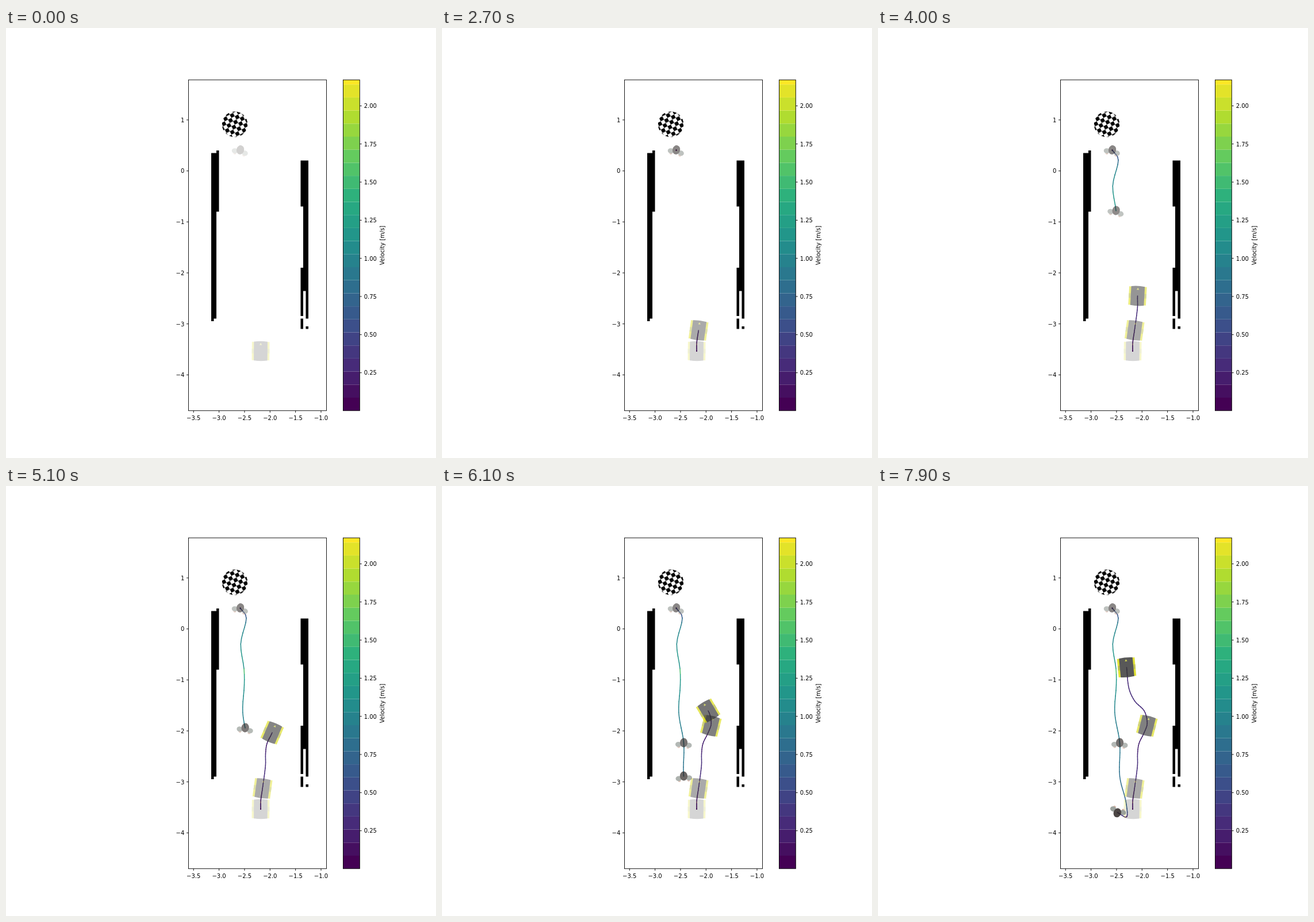
Write an HTML page that moves like this. It is 748x748 px and loops after 8 s.

```html
<!DOCTYPE html>
<html lang="en">
<head>
<meta charset="utf-8">
<title>Velocity plot</title>
<style>
html, body { margin: 0; width: 100%; height: 100%; overflow: hidden; background: #fff; }
svg { display: block; width: 100vw; height: 100vh; }
text { font: 10px "DejaVu Sans", sans-serif; }
</style>
</head>
<body>
<svg id="stage" viewBox="0 0 748 748">
  <defs>
    <pattern id="checker" width="13" height="13" patternUnits="userSpaceOnUse"
             patternTransform="translate(398 168) rotate(-27)">
      <path d="M6.5 0h6.5v6.5h-6.5zM0 6.5h6.5v6.5h-6.5z"/>
    </pattern>
    <g id="robot">
      <path d="M-15.3 -16h4.5v32h-4.5zM10.800 -16h4.500v32h-4.500z" fill="#dbdc08"/>
      <path d="M-15.300 -4h4.500v8h-4.500zM10.800 -4h4.500v8h-4.500z" fill="#b2b62c"/>
      <path d="M-11.800 -16.400Q0 -18.200 11.800 -16.400V16.400Q0 18.200 -11.800 16.400Z" fill="#333"/>
      <path d="M0 -14.200l2.200 3.600h-4.400z" fill="#bfc229"/>
    </g>
    <g id="person">
      <g fill="#d3aa99"><circle cx="-8" cy="7" r="2.500"/><circle cx="8" cy="7" r="2.500"/></g>
      <g fill="#868e88"><ellipse cx="-9" cy="3.300" rx="5.300" ry="4.500"/><ellipse cx="9" cy="3.300" rx="5.300" ry="4.500"/></g>
      <ellipse cy="-.5" rx="6.600" ry="8" fill="#241d1b"/>
    </g>
  </defs>
  <path d="M366 213h4.500v106.500h-4.500V505.500h-4.500v4.500h-4.500V217.500h9z
    M512.500 230.500h13.500V505.500h-4.500V457.500h-4.500V501h-4.500V417h4.500V310.500h-4.500z
    M512.500 505.500h4.500v18h-4.500zM521.500 519h4.500v4.500h-4.500z"/>
  <circle cx="398" cy="167.500" r="22.300" fill="url(#checker)"/>
  <g id="trails" fill="none" stroke-width="1.5" stroke-linecap="round"></g>
  <g id="figures"></g>
  <g id="bar"></g>
  <g id="axes" fill="none" stroke="#000" stroke-width=".9"></g>
  <g id="labels"></g>
</svg>
<script>
const LOOP = 8000, STEP = 100, GHOST_EVERY = 2700;
const UNIT = 88.7;
const TOP = 90.2, BOTTOM = 665.7, BAR_LEFT = 586.5, BAR_RIGHT = 615.3;
const $ = id => document.getElementById(id);

function add(parent, tag, attrs, text) {
  const el = document.createElementNS("http://www.w3.org/2000/svg", tag);
  for (const key in attrs) el.setAttribute(key, attrs[key]);
  if (text) el.textContent = text;
  parent.appendChild(el);
  return el;
}

const viridis = ["440154", "472d7b", "3b528b", "2c728e", "21918c", "28ae80", "5ec962", "addc30", "fde725"]
  .map(hex => [0, 2, 4].map(i => parseInt(hex.slice(i, i + 2), 16)));

function color(u) {
  const p = Math.max(0, Math.min(1, u)) * 8, i = Math.min(7, Math.floor(p));
  return `rgb(${viridis[i].map((c, k) => Math.round(c + (viridis[i + 1][k] - c) * (p - i)))})`;
}

// Axes and colour bar
function box(left, right) {
  add($("axes"), "rect", { x: left, y: TOP, width: right - left, height: BOTTOM - TOP });
}
function tick(x, y, dx, dy, label, attrs) {
  add($("axes"), "path", { d: `M${x} ${y}l${dx} ${dy}` });
  add($("labels"), "text", attrs, label.replace("-", "\u2212"));
}
box(317.5, 557.5);
box(BAR_LEFT, BAR_RIGHT);
for (let v = -3.5; v <= -1; v += 0.5) {
  const x = 548 + (v + 1) * UNIT;
  tick(x, BOTTOM, 0, 3.5, v.toFixed(1), { x, y: 681.5, "text-anchor": "middle" });
}
for (let v = -4; v <= 1; v++) {
  const y = 248.6 - v * UNIT;
  tick(317.5, y, -3.5, 0, String(v), { x: 310.3, y: y + 3.8, "text-anchor": "end" });
}
for (let v = 0.25; v <= 2; v += 0.25) {
  const y = 666 - v * 265.3;
  tick(BAR_RIGHT, y, 3.5, 0, v.toFixed(2), { x: 622.7, y: y + 3.8 });
}
add($("labels"), "text", { transform: "translate(658 378) rotate(-90)", "text-anchor": "middle" }, "Velocity [m/s]");

const BANDS = 25, BAND_HEIGHT = 22.7;
for (let i = 0; i <= BANDS; i++) {
  const y = Math.max(TOP, BOTTOM - (i + 1) * BAND_HEIGHT);
  const height = BOTTOM - i * BAND_HEIGHT - y;
  add($("bar"), "rect", { x: BAR_LEFT, y, width: BAR_RIGHT - BAR_LEFT, height, fill: color(i / BANDS) });
}

// Smooth curve through waypoints [seconds, x, y]
function pathThrough(points) {
  const last = points.length - 1;
  const slope = (i, k) => {
    const a = points[Math.max(0, i - 1)], b = points[Math.min(last, i + 1)];
    return (b[k] - a[k]) / (b[0] - a[0]);
  };
  return time => {
    const t = Math.max(points[0][0], Math.min(points[last][0], time));
    let i = 0;
    while (i < last - 1 && points[i + 1][0] <= t) i++;
    const a = points[i], b = points[i + 1], span = b[0] - a[0], u = (t - a[0]) / span;
    const [x, y] = [1, 2].map(k => a[k] + (b[k] - a[k]) * u * u * (3 - 2 * u)
      + span * u * (1 - u) * ((1 - u) * slope(i, k) - u * slope(i + 1, k)));
    return { x, y };
  };
}

const robotPath = pathThrough([
  [1, 443, 562], [1.9, 443.3, 546], [2.7, 446.2, 526], [3.6, 451.4, 486], [4, 451.5, 466], [4.5, 454, 448],
  [5.1, 463, 429], [5.5, 468.3, 413], [6.1, 463, 391], [6.6, 446.5, 374], [7.1, 436.5, 352], [7.9, 432.5, 315.5]
]);
const personPath = pathThrough([
  [2.7, 407.5, 212.5], [3.1, 418, 230], [3.6, 408.3, 275], [4, 414, 318], [4.3, 414.5, 346], [4.8, 411.8, 394],
  [5.4, 420.5, 447], [6.1, 420.5, 505], [6.7, 431, 548], [7.2, 433, 575], [7.9, 416.5, 568]
]);

function ease(t, from, to) {
  const u = Math.max(0, Math.min(1, (t - from) / (to - from)));
  return u * u * (3 - 2 * u);
}

// The robot faces along its path
function robotHeading(t) {
  const mid = Math.max(1.05, Math.min(7.85, t));
  const a = robotPath(mid - 0.05), b = robotPath(mid + 0.05);
  return Math.atan2(b.x - a.x, a.y - b.y) * 180 / Math.PI;
}
const personHeading = t => 13 - 17 * ease(t, 4.6, 6.2) - 156 * ease(t, 6.3, 7.9);
const burst = t => t > 4 ? 0.9 * Math.exp((4 - t) / 0.2) : 0;

const alpha = t => 0.2 + 0.078 * t;

function place(el, actor, t) {
  const { x, y } = actor.path(t);
  el.setAttribute("transform", `translate(${x} ${y}) rotate(${actor.heading(t)})`);
  el.setAttribute("opacity", alpha(t));
}

const actors = [
  { href: "#robot", path: robotPath, heading: robotHeading, speed: v => v * 0.5 },
  { href: "#person", path: personPath, heading: personHeading, speed: (v, t) => v * 0.9 + burst(t) }
];

for (const actor of actors) {
  const { href, path, speed } = actor;
  actor.timed = [];
  for (let ms = STEP; ms < LOOP; ms += STEP) {
    const t = ms / 1000, a = path(t - STEP / 1000), b = path(t);
    const v = Math.hypot(b.x - a.x, b.y - a.y) / UNIT * 1000 / STEP;
    const el = add($("trails"), "path", {
      d: `M${a.x} ${a.y}L${b.x} ${b.y}`, stroke: color(speed(v, t) / 2.17)
    });
    actor.timed.push({ ms, el });
  }
  for (let ms = 0; ms < LOOP; ms += GHOST_EVERY) {
    const el = add($("figures"), "use", { href });
    place(el, actor, ms / 1000);
    actor.timed.push({ ms: ms + STEP, el });
  }
  actor.live = add($("figures"), "use", { href });
}

function draw(now) {
  const ms = Math.floor((now % LOOP) / STEP) * STEP;
  for (const actor of actors) {
    for (const part of actor.timed) part.el.style.display = part.ms <= ms ? "" : "none";
    place(actor.live, actor, ms / 1000);
  }
}

const start = performance.now();
function frame() {
  draw(performance.now() - start);
  requestAnimationFrame(frame);
}
frame();
</script>
</body>
</html>
```
